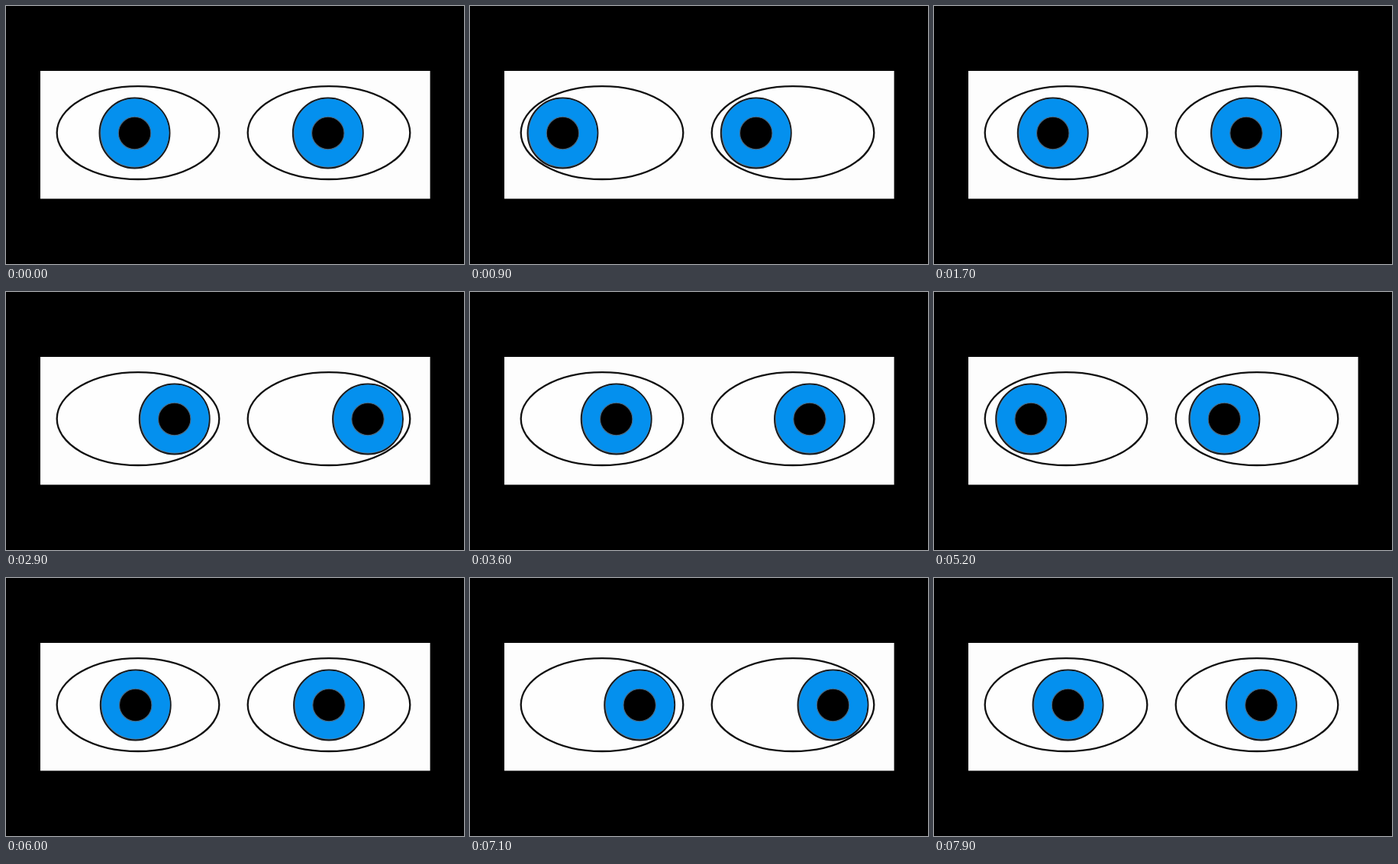
Animation of 600x338 px, one loop 8000 ms. Source, as an HTML page:

```html
<!DOCTYPE html>
<html lang="en">
<head>
<meta charset="utf-8">
<title>Looking eyes</title>
<style>
  html, body { margin: 0; width: 100%; height: 100%; overflow: hidden; background: #000; }
  svg { display: block; width: 100%; height: 100%; }
</style>
</head>
<body>
<svg viewBox="0 0 600 338">
  <defs>
    <ellipse id="eye" cx="173" cy="166.1" rx="106.3" ry="60.9" fill="#fefefe" stroke="#111" stroke-width="2.3"/>
    <g id="iris">
      <circle r="46" fill="#5d7486" stroke="#17191c" stroke-width="1.9"/>
      <circle cx=".4" cy="-.4" r="44.7" fill="#0490ee"/>
      <circle r="21.2" stroke="#4b6880" stroke-width="1.1"/>
    </g>
  </defs>
  <rect width="600" height="338"/>
  <rect x="45" y="85" width="510.6" height="167.5" fill="#fdfdfd"/>
  <use href="#eye"/>
  <use href="#eye" x="250"/>
  <g id="gaze">
    <use href="#iris"/>
    <use href="#iris" x="253.3"/>
  </g>
</svg>
<script>
  const DURATION = 8000, STEP = 100, CENTER_Y = 166.5;
  // Start, turning points and end of the sweep: time in ms, x of the left iris.
  const turns = [[0, 168.5], [985, 117], [2975, 224.8], [5010, 117], [7045, 225.4], [DURATION, 169.7]];
  const gaze = document.getElementById('gaze');

  function gazeX(t) {
    const i = turns.findIndex(([time]) => time > t);
    const [t0, x0] = turns[i - 1], [t1, x1] = turns[i];
    return x0 + (x1 - x0) * (t - t0) / (t1 - t0);
  }

  function draw(now) {
    const t = Math.floor((now % DURATION) / STEP) * STEP;
    gaze.setAttribute('transform', `translate(${gazeX(t).toFixed(2)} ${CENTER_Y})`);
  }

  const start = performance.now();
  function tick() {
    draw(performance.now() - start);
    requestAnimationFrame(tick);
  }
  tick();
</script>
</body>
</html>
```
